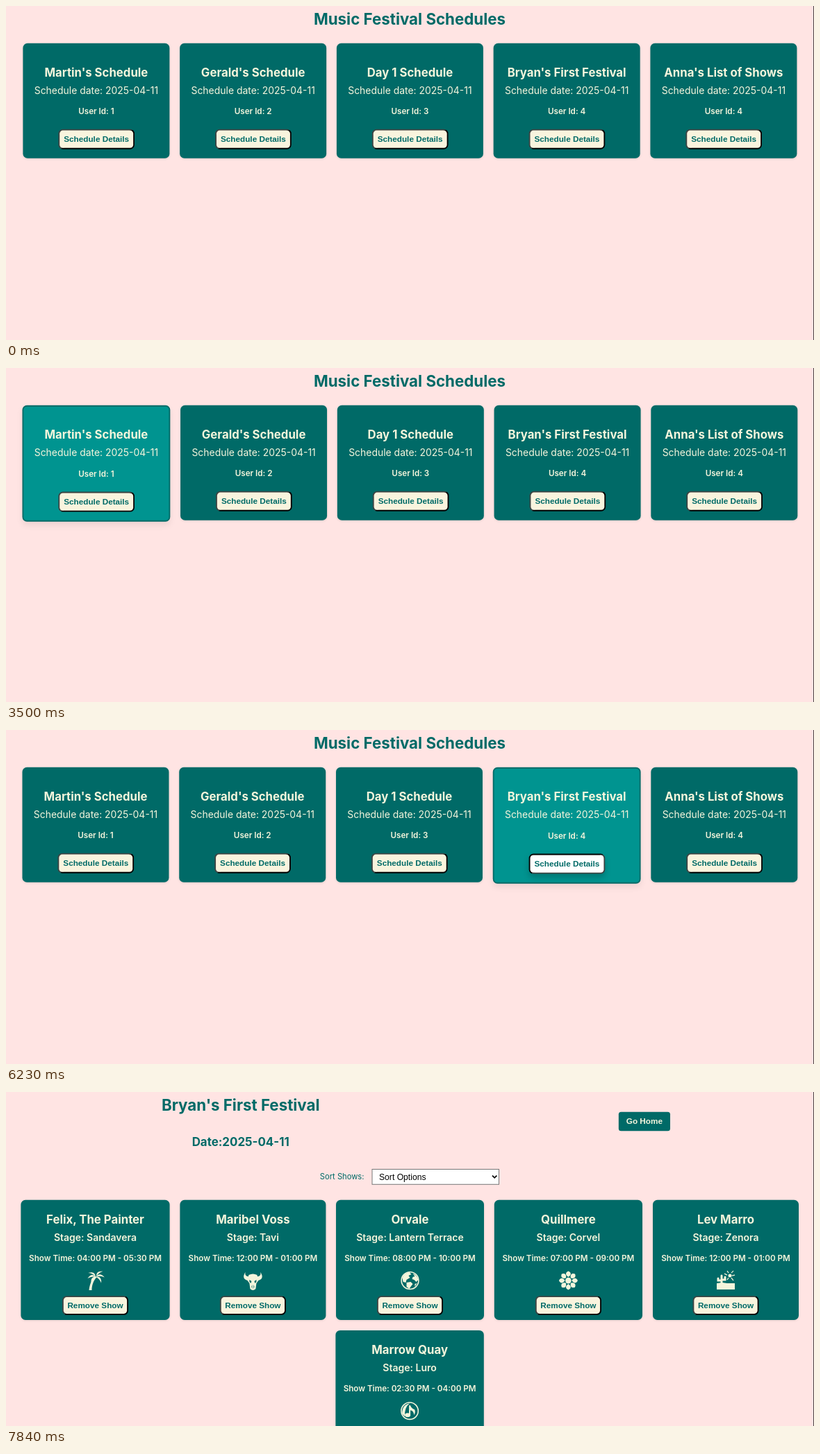
Recreate the animation shown at these times as an HTML page. Size 1163 by 482 pixels, loop 8 s.

```html
<!DOCTYPE html>
<html lang="en">
<head>
<meta charset="utf-8">
<title>Festival schedules</title>
<style>
  html, body { margin: 0; width: 100%; height: 100%; overflow: hidden; background: #ffe4e3; }
  svg { display: block; width: 100vw; height: 100vh; }
  text { font-family: Inter, "Open Sans", sans-serif; text-anchor: middle; fill: #f5f5dc; }
  .title { font-size: 22.3px; font-weight: 700; fill: #006a67; }
  .sub { font-size: 16.9px; font-weight: 700; fill: #006a67; }
  .head { font-size: 16.75px; font-weight: 700; }
  .line { font-size: 13.95px; }
  .stage { font-size: 14px; font-weight: 600; }
  .small { font-size: 11.65px; font-weight: 600; }
  .label { font-size: 11.2px; fill: #006a67; text-anchor: start; }
  .btn, .option { font-family: "Liberation Sans", Arial, sans-serif; }
  .btn { font-size: 11.74px; font-weight: 700; }
  .dark { fill: #006a67; }
  .option { font-size: 12.15px; fill: #000; text-anchor: start; }
  .card { filter: drop-shadow(0 1.8px 1.8px rgba(0, 0, 0, .1)); }
  .card.over { filter: drop-shadow(0 5.5px 4px rgba(0, 0, 0, .07)); }
  .lift { filter: drop-shadow(0 5.5px 4px rgba(0, 0, 0, .2)); }
  .icon { fill: #f5f5dc; stroke: none; }
  .icon .pen { fill: none; stroke: #f5f5dc; }
</style>
</head>
<body>
<svg viewBox="0 0 1163 482" preserveAspectRatio="none">
  <defs>
    <linearGradient id="outset" x2="1" y2="1">
      <stop offset=".5" stop-color="#3c4443"/><stop offset=".5" stop-color="#000"/>
    </linearGradient>
    <linearGradient id="inset" x2="1" y2="1">
      <stop offset=".5" stop-color="#000"/><stop offset=".5" stop-color="#3c4443"/>
    </linearGradient>
  </defs>
  <rect width="1163" height="482" fill="#ffe4e3"/>
  <g id="view"></g>
  <rect x="1162" width="1" height="482" fill="#4b4344"/>
</svg>
<script>
const LOOP = 8000;
const PX = 0.917; // one layout pixel on the stage
const TEAL = '#006a67', BRIGHT = '#009490', CREAM = '#f9f4de';
const view = document.getElementById('view');

// [start, page, hovered card, button state]
const steps = [
  [0, 'list', -1],
  [3150, 'list', 4],
  [3220, 'list', 3],
  [3290, 'list', 2],
  [3360, 'list', 1],
  [3430, 'list', -1],
  [3500, 'list', 0],
  [4060, 'list', 1],
  [4480, 'list', 2],
  [4900, 'list', -1],
  [4970, 'list', 3],
  [5740, 'list', 3, 'hover'],
  [6230, 'list', 3, 'press'],
  [6370, 'blank', -1],
  [6790, 'detail', 3],
  [7490, 'detail', 2],
  [7840, 'detail', -1]
];

const schedules = [
  ["Martin's Schedule", 1],
  ["Gerald's Schedule", 2],
  ['Day 1 Schedule', 3],
  ["Bryan's First Festival", 4],
  ["Anna's List of Shows", 4]
];

// name, stage, show time, icon, left edge, width
const shows = [
  ['Felix, The Painter', 'Sandavera', '04:00 PM - 05:30 PM', 'palm', 21.4, 214.2],
  ['Maribel Voss', 'Tavi', '12:00 PM - 01:00 PM', 'skull', 250.4, 210],
  ['Orvale', 'Lantern Terrace', '08:00 PM - 10:00 PM', 'globe', 475, 213],
  ['Quillmere', 'Corvel', '07:00 PM - 09:00 PM', 'flower', 702.8, 213.2],
  ['Lev Marro', 'Zenora', '12:00 PM - 01:00 PM', 'desert', 931, 210]
];
const lastShow = ['Marrow Quay', 'Luro', '02:30 PM - 04:00 PM', 'note', 474.4, 213.4];

const turned = (angles, shape) =>
  angles.map(a => `<g transform="rotate(${a})">${shape}</g>`).join('');

const icons = {
  palm: `<path d="M-9 14C-8 5-5-1-1-6L2-5C-3 1-5 7-5 14Z"/>
    <g transform="translate(1 -6)">${turned([-50, -8, 38], '<path d="M0 1Q6-6 12 3Q6-1 0 1Z"/>')}
    <g transform="scale(-1 1)">${turned([-38, 0, 42], '<path d="M0 1Q6-6 12 3Q6-1 0 1Z"/>')}</g></g>`,
  skull: `<path d="M-11-12Q-17-2-7 0L-5-6Q-12-5-11-12ZM11-12Q17-2 7 0L5-6Q12-5 11-12Z"/>
    <path fill-rule="evenodd" d="M-6-8Q0-11 6-8L8 0L5 4L4 12Q0 16-4 12L-5 4L-8 0ZM-5-1L-2 1L-3 4L-5 2ZM5-1L2 1L3 4L5 2ZM-2 9L-1 6V12ZM2 9L1 6V12Z"/>`,
  globe: `<circle class="pen" r="12.4" stroke-width="1.6"/>
    <path d="M-11-4Q-8-11-1-12L2-9L-2-7L0-4L-5-1L-6 3L-10 2ZM4-10Q10-8 12-1L9 2L6-1L3-2L4-5L7-6ZM-5 3L1 2L4 5L1 9L-1 12L-5 9ZM7 5L10 4L7 9Z"/>`,
  flower: turned([0, 45, 90, 135, 180, 225, 270, 315],
    '<path d="M0-5C-5-8-4-12 0-13.5C4-12 5-8 0-5Z"/>') + '<circle r="4.3"/>',
  desert: `<path d="M-13 4L-5 3L2 4H13V13H-13Z"/>
    <path class="pen" stroke-width="3" stroke-linecap="round" d="M-6 4V-7M-11-3V0H-6M-1-5V-1H-6"/>
    <circle cx="6" cy="-7" r="2.5"/>
    <path class="pen" stroke-width="1.2" d="M2-8L-2-10M4-11L2-14M8-11L11-14M9-7L13-8M8-4L11 0M4-4L2-1"/>`,
  note: `<circle class="pen" r="12.2" stroke-width="1.6"/>
    <path d="M-11 4Q-11-9 0-11Q-8-5-7 8Z"/><ellipse cx="-3" cy="6" rx="4" ry="3"/>
    <path d="M-1 6V-8H1Q2-4 7-2Q9 2 6 6Q6 0 1-1V6Z"/>`
};

// Both fonts centre their capitals at about 0.36em above the baseline.
const sizes = { title: 22.3, sub: 16.9, head: 16.75, line: 13.95, stage: 14, small: 11.65, label: 11.2, btn: 11.74, option: 12.15 };
const text = (kind, x, y, words, extra = '') =>
  `<text class="${kind} ${extra}" x="${x}" y="${y + sizes[kind] * 0.36}">${words}</text>`;

const rect = (x, y, w, h, r, fill) =>
  `<rect x="${x}" y="${y}" width="${w}" height="${h}" rx="${r}" fill="${fill}"/>`;

function button(cx, y, w, h, words, state) {
  const edge = 2 * PX;
  const border = state === 'press' ? 'inset' : 'outset';
  return `<g class="${state ? 'lift' : ''}">
    ${rect(cx - w / 2, y, w, h, 6.4, `url(#${border})`)}
    ${rect(cx - w / 2 + edge, y + edge, w - 2 * edge, h - 2 * edge, 4.6, state ? '#fff' : CREAM)}</g>
    ${text('btn', cx, y + h / 2 - 0.7, words, 'dark')}`;
}

// A hovered card gains one layout pixel of border on each side.
function card(x, y, w, h, over, content) {
  if (!over) return `<g class="card">${rect(x, y, w, h, 6.6, TEAL)}</g>${content}`;
  return `<g class="card over">${rect(x - PX, y, w + 2 * PX, h + 2 * PX, 6.6, TEAL)}
    ${rect(x + PX, y + 2 * PX, w - 2 * PX, h - 2 * PX, 4.8, BRIGHT)}</g>
    <g transform="translate(0 ${PX})">${content}</g>`;
}

const shift = (i, hovered) => hovered < 0 ? 0 : Math.sign(i - hovered) * PX;

function scheduleCard([name, user], i, hovered, state) {
  const w = 211, x = 24.4 + 225.75 * i + shift(i, hovered), cx = x + w / 2;
  const over = i === hovered;
  return card(x, 53.8, w, 166, over,
    text('head', cx, 95.5, name) +
    text('line', cx, 121.5, 'Schedule date: 2025-04-11') +
    text('small', cx, 151.7, `User Id: ${user}`) +
    button(cx + 0.3, 177.7, 109.6, 29, 'Schedule Details', over && state));
}

function showCard([name, stage, time, icon, left, w], y, dx, over) {
  const x = left + dx, cx = x + w / 2;
  return card(x, y, w, 173.2, over,
    text('head', cx, y + 27.7, name) +
    text('stage', cx, y + 53.7, `Stage: ${stage}`) +
    text('small', cx, y + 83.9, `Show Time: ${time}`) +
    `<g class="icon" transform="translate(${cx} ${y + 116.3})">${icons[icon]}</g>` +
    button(cx, y + 138.4, 95, 27.6, 'Remove Show'));
}

const pages = {
  blank: () => '',
  list: (hovered, state) =>
    text('title', 581, 18.5, 'Music Festival Schedules') +
    schedules.map((s, i) => scheduleCard(s, i, hovered, state)).join(''),
  detail: hovered =>
    text('title', 337.7, 18.5, schedules[3][0]) +
    text('sub', 337.7, 72, 'Date:2025-04-11') +
    rect(881.8, 28.7, 74.2, 27.6, 3.6, TEAL) +
    text('btn', 918.9, 42.2, 'Go Home') +
    text('label', 451.8, 122.4, 'Sort Shows:') +
    '<rect x="527" y="111.5" width="182.5" height="21.8" fill="#fff" stroke="#767676"/>' +
    text('option', 537, 122.3, 'Sort Options') +
    '<path d="M700 120.6L703.2 123.8L706.4 120.6" fill="none" stroke="#000" stroke-width="1.7"/>' +
    shows.map((s, i) => showCard(s, 155.8, shift(i, hovered), i === hovered)).join('') +
    showCard(lastShow, 343.9 + (hovered < 0 ? 0 : 2 * PX), 0, false)
};

let shown;
function tick() {
  const t = performance.now() % LOOP;
  const step = steps.findLast(s => s[0] <= t);
  if (step !== shown) {
    shown = step;
    const [, page, hovered, state] = step;
    view.innerHTML = pages[page](hovered, state);
  }
  requestAnimationFrame(tick);
}
tick();
</script>
</body>
</html>
```
